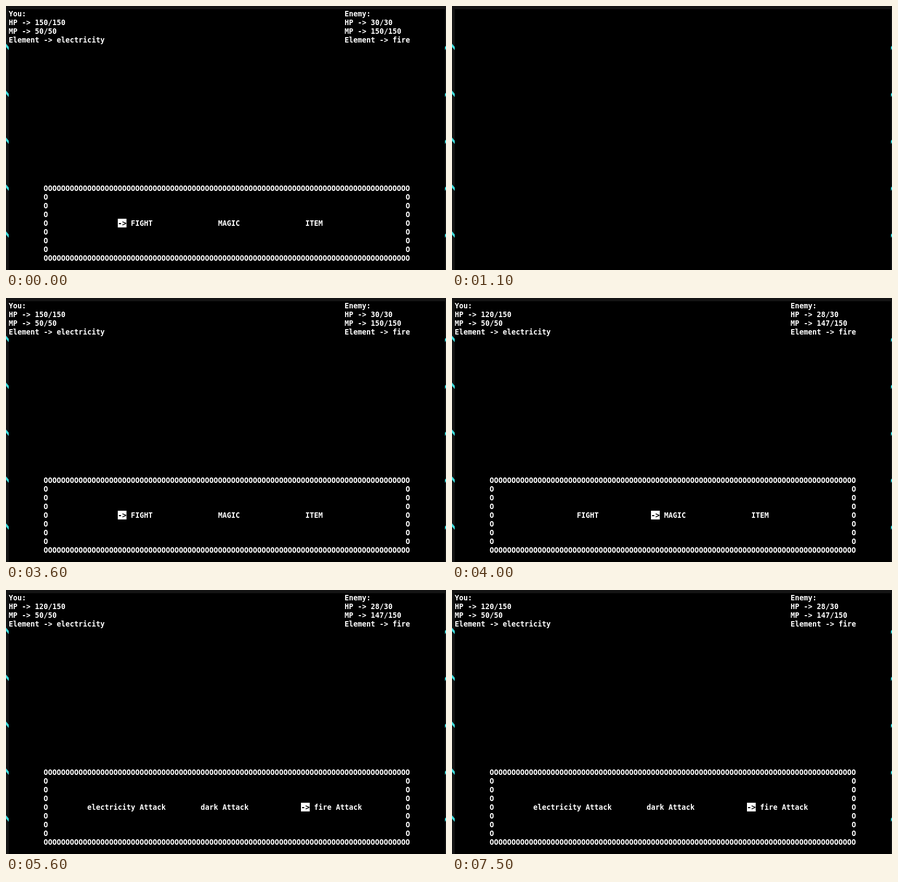
These frames come from a looping animation (807 px wide and 484 px high, 8 s). An HTML page with a canvas:

```html
<!DOCTYPE html>
<html lang="en">
<head>
<meta charset="utf-8">
<title>Terminal battle</title>
<style>
  html, body { margin: 0; width: 100%; height: 100%; overflow: hidden; background: #141414; }
  canvas { display: block; }
</style>
</head>
<body>
<canvas id="stage" width="807" height="484"></canvas>
<script>
const ctx = document.getElementById('stage').getContext('2d');
const LOOP = 8000;
const CELL_W = 8, CELL_H = 16, LEFT = 5, TOP = 6, BASE = 13;
const FONT = 'bold 13.29px "DejaVu Sans Mono", monospace';

const MAIN = { gap: 20, first: 28, items: ['FIGHT', 'MAGIC', 'ITEM'] };
const SPELLS = { gap: 26, first: 18, items: ['electricity Attack', 'dark Attack', 'fire Attack'] };

// Each entry changes part of the state from its time on.
const timeline = [
  [0, { clear: false, menu: MAIN, pick: 0, hurt: false, note: '' }],
  [500, { clear: true }],
  [700, { clear: false }],
  [1100, { clear: true }],
  [1200, { clear: false }],
  [1700, { note: 'You hit the enemy and dealt 2 points of damage.' }],
  [2700, { note: 'You received 30 points of damage from fire.' }],
  [3600, { note: '' }],
  [3700, { clear: true }],
  [3800, { clear: false, hurt: true }],
  [4000, { pick: 1 }],
  [4200, { menu: SPELLS, pick: 0 }],
  [4700, { clear: true }],
  [4800, { clear: false, pick: 1 }],
  [5100, { pick: 2 }],
  [5500, { clear: true }],
  [5600, { clear: false }],
  [6900, { clear: true }],
  [7000, { clear: false }],
  [7400, { clear: true }],
  [7500, { clear: false }]
];

function stateAt(t) {
  const state = {};
  for (const [start, change] of timeline) {
    if (start <= t) Object.assign(state, change);
  }
  return state;
}

function put(col, row, text, inverse = false) {
  const x = LEFT + col * CELL_W, y = TOP + row * CELL_H;
  if (inverse) {
    ctx.fillStyle = '#fff';
    ctx.fillRect(x, y, text.length * CELL_W, CELL_H);
  }
  ctx.fillStyle = inverse ? '#000' : '#fff';
  ctx.fillText(text, x, y + BASE);
}

function shape(points) {
  ctx.beginPath();
  for (const [x, y] of points) ctx.lineTo(x, y);
  ctx.fill();
}

function drawDesktop() {
  ctx.fillStyle = '#141414';
  ctx.fillRect(0, 0, 807, 484);
  ctx.fillStyle = '#40e0e0';
  for (let y = 75; y < 484; y += 86) {
    shape([[0, y - 6], [5, y], [5, y + 6], [0, y]]);
    shape([[805, y], [807, y - 2], [807, y + 3], [805, y + 6]]);
  }
  ctx.fillStyle = '#000';
  ctx.fillRect(LEFT, TOP, 800, 478);
}

function drawStats(col, name, hp, mp, element) {
  const lines = [name + ':', 'HP -> ' + hp, 'MP -> ' + mp, 'Element -> ' + element];
  lines.forEach((line, row) => put(col, row, line));
}

function drawBox() {
  const edge = 'O'.repeat(84);
  put(8, 20, edge);
  put(8, 28, edge);
  for (let row = 21; row < 28; row++) {
    put(8, row, 'O');
    put(91, row, 'O');
  }
}

function drawMenu({ gap, first, items }, pick) {
  items.forEach((item, i) => {
    const col = first + i * gap;
    put(col, 24, item);
    if (i === pick) put(col - 3, 24, '->', true);
  });
}

function draw(t) {
  const { clear, menu, pick, hurt, note } = stateAt(t);
  drawDesktop();
  if (clear) return;
  ctx.font = FONT;
  drawStats(0, 'You', hurt ? '120/150' : '150/150', '50/50', 'electricity');
  drawStats(77, 'Enemy', hurt ? '28/30' : '30/30', hurt ? '147/150' : '150/150', 'fire');
  put(27, 15, note);
  drawBox();
  drawMenu(menu, pick);
}

const begin = performance.now();
function tick() {
  draw((performance.now() - begin) % LOOP);
  requestAnimationFrame(tick);
}
tick();
</script>
</body>
</html>
```
